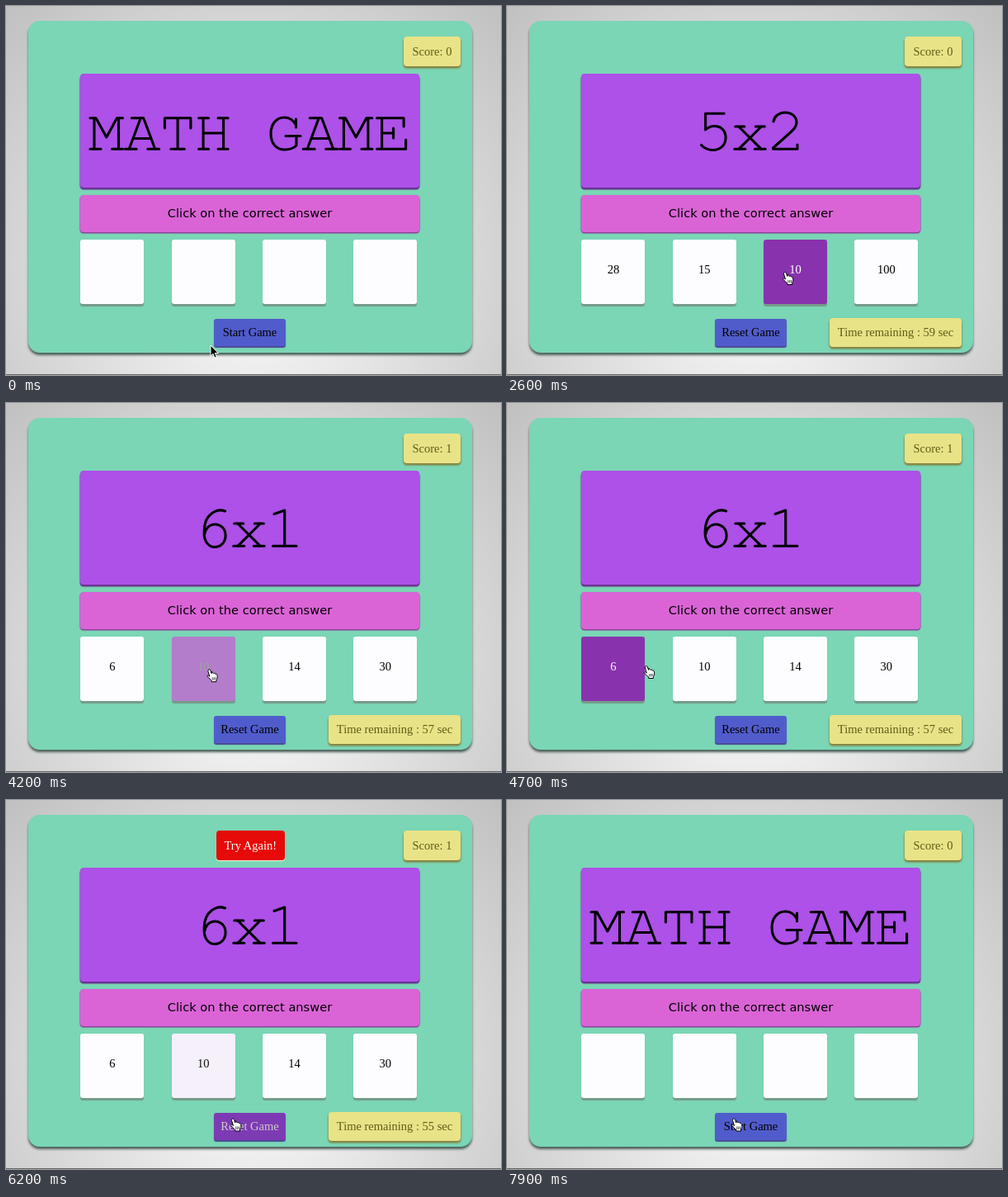
An HTML page that plays this animation: 600x447 px, repeating every 8000 ms.

```html
<!DOCTYPE html>
<html lang="en">
<head>
<meta charset="utf-8">
<title>Math Game</title>
<style>
html, body { margin: 0; width: 100%; height: 100%; overflow: hidden; }
body { position: relative; background: radial-gradient(farthest-corner at 50% 70%, #fff, #c0c0c0);
  font: 14.5px "Liberation Serif", "Times New Roman", serif; }
div { position: absolute; box-sizing: border-box; border-radius: 4px; text-align: center; white-space: pre; }
svg { position: absolute; left: 0; top: 0; }
.note { background: #e8e387; color: #5f5c18; box-shadow: 0 2px 2px .5px #858140; }
.answer { box-shadow: 0 3px 1px #769a8b; border-radius: 3px; }
#panel { background: #7ad6b5; border-radius: 14px; box-shadow: 0 3px 3px #4c625a; }
#title { background: #ad51e8; box-shadow: 0 2px 1px .5px #6a2f92; }
#hint { background: #da64d6; box-shadow: 0 1px 1px .5px #92389d; font: 14.6px "DejaVu Sans", Verdana, sans-serif; }
#start { box-shadow: 0 2px 1px #4a4798; border-radius: 3px; }
#verdict { color: #fff; box-shadow: 0 1px 1px #f4f4dc; }
#edge { background: #666; border-radius: 0; }
</style>
</head>
<body>
<script>
const LOOP = 8000, STEP = 100, FADE = 150;
const START = 900, RIGHT = 3100, WRONG = 5300, RESET = 6700, SHOWN = 1000;
const CELL = 43.2, CENTER = 294.4, BASE = 175;

// Slab letter strokes in one cell, baseline at 0
const GLYPHS = {
  M: "M2-39.3H9L21.8-16L34.5-39.3H41.5M7-39.3V-1.7M36.5-39.3V-1.7M2-1.7H15M28.5-1.7H41.5",
  A: "M9-39.3H23.5L37.5-1.7M20-39.3L6-1.7M1-1.7H15M28.5-1.7H42.5M11-14.5H32.5",
  T: "M21.7-39.3V-1.7M6-27V-39.3H37.5V-27M13.5-1.7H30",
  H: "M9.5-39.3V-1.7M34-39.3V-1.7M4-39.3H16M27.5-39.3H39.5M4-1.7H16M27.5-1.7H39.5M9.5-21H34",
  G: "M35.5-28V-38M35.5-31C32-37 27-40 21.5-40C11-40 5-31 5-20.5C5-8 12-1 22-1C28-1 33-3 36-6V-17.5M23-17.5H41",
  E: "M10-39.3V-1.7M4-39.3H36.5V-29M4-1.7H39V-13M10-21H24M24-27V-15",
  x: "M8-29L35.5-1.7M35.5-29L8-1.7M4-29H15M28.5-29H39.5M3-1.7H16M27.5-1.7H40.5",
  1: "M9-40.5L21.7-45V-1.7M7.5-1.7H36",
  2: "M7-35C8-41.5 14-46 21-46C29-46 35-41 35-34C35-28.5 31-25 26-20.5L6.5-3V-1.7H36V-7",
  5: "M33.5-44.7H11V-25C14-28 18-29.5 22-29.5C30-29.5 35.5-24 35.5-15.5C35.5-6.5 29-.5 20-.5C14-.5 9.5-2.5 6-6.5",
  6: "M36-44C27-47.5 10-42 10.5-18C10.5-7 16-.5 23.5-.5C31-.5 36.5-6.5 36.5-14.5C36.5-22.5 31-28 24-28C17-28 11.5-22.5 10.7-15"
};

// Pointer path: time, x, y
const PATH = [
  [0, 248, 411], [300, 248, 411], [700, 284.5, 404.5], [1300, 284.5, 404.5],
  [1700, 335, 335], [2600, 335.5, 322.5], [3700, 329.5, 326.5], [4000, 318, 325],
  [4350, 190, 321], [4550, 167.4, 318.5], [4700, 167.3, 318.5], [4900, 240, 325],
  [5850, 240, 330], [6030, 246, 335], [6090, 273.5, 386], [LOOP, 273.5, 386]
];

function box(x, y, w, h, id, cls = "", line = h) {
  const el = document.createElement("div");
  el.id = id;
  el.className = cls;
  el.style.cssText = `left:${x}px;top:${y}px;width:${w}px;height:${h}px;line-height:${line}px`;
  el.rect = [x, y, w, h];
  document.body.append(el);
  return el;
}

box(27, 18, 537.5, 402, "panel");
box(0, 446, 600, 1, "edge");
const score = box(482, 37, 69, 36, "score", "note");
const timer = box(391, 378, 160, 35, "timer", "note");
box(90, 82, 411, 137.5, "title");
box(90, 228.5, 411, 45, "hint", "", 44).textContent = "Click on the correct answer";
const answers = [0, 1, 2, 3].map(i => box(90.3 + 110.3 * i, 283, 77.2, 78, "a" + i, "answer", 73));
const start = box(252, 379, 87, 32.5, "start", "", 32);
const verdict = box(0, 37, 0, 36, "verdict");

document.body.insertAdjacentHTML("beforeend", `
<svg width="600" height="447">
  <text id="plain" x="${CENTER}" y="${BASE}" text-anchor="middle" fill="none"
    font-size="72" font-family="Liberation Mono, monospace"></text>
  <g id="word" fill="none" stroke="#000" stroke-width="3.1" stroke-linecap="round" stroke-linejoin="round"></g>
  <g id="pointer" stroke-linejoin="round">
    <path id="arrow" fill="#000" stroke="#fff" d="M0 0V13L3 10.3L5 15L7.3 14L5.3 9.5H9.3Z"/>
    <path id="hand" fill="#fff" stroke="#000" d="M.2 .8C1.2-.6 2.6 0 3 1.3L4.3 5C5-.0 4.8 4 6 4.2L6.8 5C7.6 4.2 8.6 4.6 9 5.6C10.2 5.2 11 6 11.2 7.5C11.6 10 11 11.5 10 13V15H4.3V13.6C3 12.3 1.5 10.5-.9 8.6C-1.6 7.4-.3 6.8 .8 7.6L2 8.6L.1 2.5Z"/>
    <path id="knuckles" fill="none" stroke="#000" stroke-width=".7" d="M5.3 9.5V13M7.2 9.5V13M9 9.5V12.5"/>
  </g>
</svg>`);
const $ = id => document.getElementById(id);

function pointerAt(t) {
  const i = Math.max(1, PATH.findIndex(p => p[0] >= t));
  const [a, b] = [PATH[i - 1], PATH[i]];
  const k = Math.max(0, (t - a[0]) / (b[0] - a[0]));
  return [a[1] + (b[1] - a[1]) * k, a[2] + (b[2] - a[2]) * k];
}

function hit([px, py], [x, y, w, h]) {
  return px >= x && px <= x + w && py >= y && py <= y + h;
}

// Share of the last FADE ms spent over the box: a linear hover transition
function hover(t, rect) {
  if (t >= RESET) return 0;
  let n = 0;
  for (let d = 0; d < FADE; d += 5) n += hit(pointerAt(t - d), rect);
  return n * 5 / FADE;
}

function tint(el, t, base) {
  const p = hover(t, el.rect) * 100;
  el.style.background = `color-mix(in srgb, #8833ad ${p}%, ${base})`;
  el.style.color = `color-mix(in srgb, #fff ${p}%, #000)`;
}

function setWord(text) {
  if ($("plain").textContent === text) return;
  $("plain").textContent = text;
  const left = CENTER - text.length * CELL / 2;
  $("word").innerHTML = [...text].map((c, i) =>
    `<path transform="translate(${left + CELL * i} ${BASE})" d="${GLYPHS[c] || ""}"/>`).join("");
}

function showVerdict(text, x, w, color) {
  verdict.textContent = text;
  Object.assign(verdict.style, { left: x + "px", width: w + "px", background: color });
}

function draw(t) {
  const playing = t >= START && t < RESET, second = t >= RIGHT;
  const within = from => t >= from && t < from + SHOWN;

  setWord(!playing ? "MATH GAME" : second ? "6x1" : "5x2");
  score.textContent = "Score: " + (playing && second ? 1 : 0);
  timer.style.display = playing ? "" : "none";
  timer.textContent = `Time remaining : ${60 - Math.floor((t - START) / 1000)} sec`;
  start.textContent = playing ? "Reset Game" : "Start Game";
  tint(start, t, "#505ccb");

  const values = second ? [6, 10, 14, 30] : [28, 15, 10, 100];
  answers.forEach((el, i) => {
    el.textContent = playing ? values[i] : "";
    tint(el, t, "#fdfdff");
  });

  verdict.style.display = within(RIGHT) || within(WRONG) ? "" : "none";
  if (within(RIGHT)) showVerdict("Correct!", 264, 68, "#18b81a");
  else showVerdict("Try Again!", 254.5, 83.5, "#e60a08");

  const p = pointerAt(t), over = [start, ...answers].some(el => hit(p, el.rect));
  $("pointer").setAttribute("transform", `translate(${p})`);
  $("arrow").style.display = over ? "none" : "";
  $("hand").style.display = $("knuckles").style.display = over ? "" : "none";
}

const begun = performance.now();
function frame() {
  const t = (performance.now() - begun) % LOOP;
  draw(Math.floor(t / STEP) * STEP);
  requestAnimationFrame(frame);
}
frame();
</script>
</body>
</html>
```
